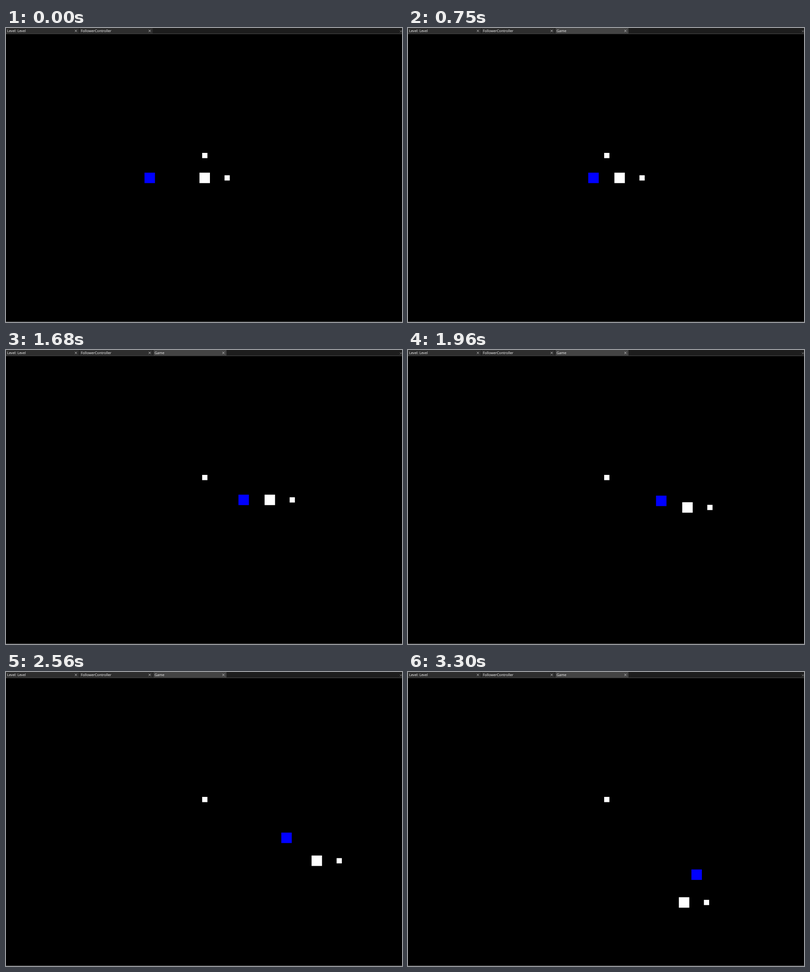
An HTML page that plays this animation: 868x645 px, repeating every 3.33 s.

```html
<!DOCTYPE html>
<html lang="en">
<head>
<meta charset="utf-8">
<title>Follower</title>
<style>
  html, body { margin: 0; width: 100%; height: 100%; overflow: hidden; background: #000; }
  svg { display: block; width: 868px; height: 645px; }
  text { font: 7.7px "Noto Sans", "Open Sans", sans-serif; fill: #f0f0f0; text-rendering: geometricPrecision; }
  .cross { stroke: #d0d0d0; stroke-width: .9; fill: none; }
  .tab { fill: #2e2e2e; }
  .active { fill: #444; }
</style>
</head>
<body>
<svg viewBox="0 0 868 645">
  <defs><path id="cross" d="M-2.3-2.3 2.3 2.3M2.3-2.3-2.3 2.3"/></defs>
  <rect width="868" height="645"/>
  <rect width="868" height="12" fill="#1d1d1d"/>
  <rect y="12" width="868" height="1.3" fill="#444"/>
  <rect y="643.3" width="868" height="1.7" fill="#2e2e2e"/>

  <g>
    <rect class="tab" width="160" height="12"/>
    <text x="2.4" y="8.8">Level: Level</text>
    <use href="#cross" class="cross" x="153.2" y="6.3"/>
  </g>
  <g transform="translate(161.7)">
    <rect class="tab" width="160" height="12"/>
    <text x="2.4" y="8.8">FollowerController</text>
    <use href="#cross" class="cross" x="153.2" y="6.3"/>
  </g>
  <g id="game" transform="translate(323.3)">
    <rect class="active" width="160" height="12"/>
    <text x="2.4" y="8.8">Game</text>
    <use href="#cross" class="cross" x="153.2" y="6.3"/>
  </g>
  <use href="#cross" class="cross" x="865.6" y="7.4" opacity=".55"/>

  <rect x="430" y="274" width="11.5" height="11.5" fill="#fff"/>
  <rect id="follower" width="22.9" height="22.9" fill="#00f"/>
  <g id="player" fill="#fff">
    <rect width="22.9" height="22.9"/>
    <rect x="54.9" y="5.7" width="11.5" height="11.5"/>
  </g>
</svg>
<script>
  const LOOP = 3330, TICK = 46.9, LEAD = 16, LAST = 70;
  const SPEED = 5.72; // pixels per tick
  const SUB = 10;     // simulation steps per tick

  // How long a key has been held by a given tick.
  const held = (tick, down, up = Infinity) => Math.max(0, Math.min(tick, up) - down);

  function playerAt(tick) {
    const right = held(tick, 11.05, 54.8), left = held(tick, 55.9), down = held(tick, 39.1);
    return [424.1 + SPEED * (right - left), 317.4 + SPEED * down];
  }

  // The follower always heads for the player at constant speed.
  function followerAt(tick) {
    let x = 303.6, y = 317.4;
    for (let n = 0; n < tick * SUB; n++) {
      const [px, py] = playerAt((n + .5) / SUB);
      const step = SPEED / SUB / Math.hypot(px - x, py - y);
      x += (px - x) * step;
      y += (py - y) * step;
    }
    return [x, y];
  }

  const byId = id => document.getElementById(id);
  const game = byId("game"), player = byId("player"), follower = byId("follower");
  const place = (el, [x, y]) => el.setAttribute("transform", `translate(${x.toFixed(2)} ${y.toFixed(2)})`);

  function draw(time) {
    const tick = Math.min(LAST, Math.floor((time + LEAD) / TICK));
    game.setAttribute("visibility", tick ? "visible" : "hidden");
    place(player, playerAt(tick));
    place(follower, followerAt(tick));
  }

  const start = performance.now();
  function frame() {
    draw((performance.now() - start) % LOOP);
    requestAnimationFrame(frame);
  }
  frame();
</script>
</body>
</html>
```
